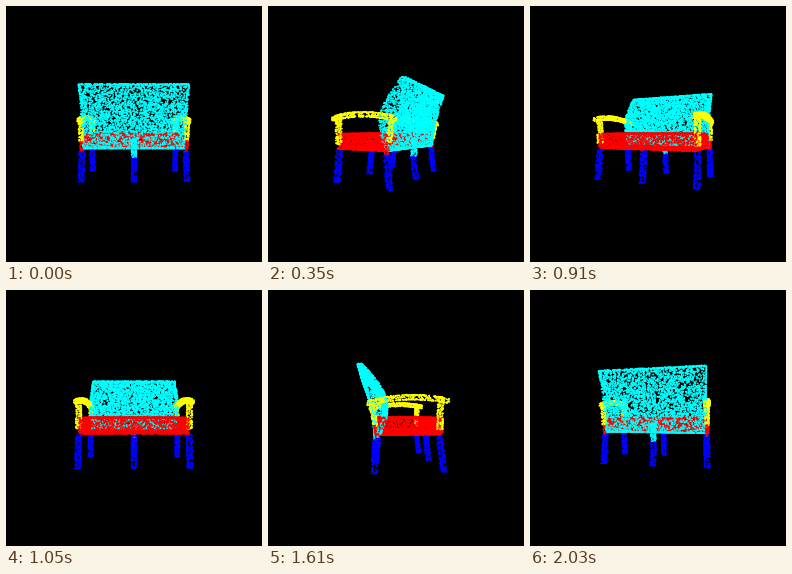
Animation, 256 px wide and 256 px high, one loop 2.1 s. Source, as a matplotlib script:

```python
import numpy as np
import matplotlib.pyplot as plt
from matplotlib.animation import FuncAnimation

SIZE, FRAMES, INTERVAL = 256, 30, 70
CAMERA = 215      # distance from the eye to the turning axis
DENSITY = 0.32    # points per unit of surface
DOT = 1.85        # dot diameter in pixels
CYAN, RED, YELLOW, BLUE = (0, 1, 1), (1, 0, 0), (1, 1, 0), (0, 0, 1)

SIDE = 47.5                    # legs and arms stand at -SIDE and SIDE
FRONT, REAR = 30, -19          # depth of the leg tops
TOP, BASE, FLOOR = -42, 13, 42.5

rng = np.random.default_rng(7)
points, colors = [], []


def shell(hx, hy, hz, density=DENSITY):
    """Random points on a box surface, in unit coordinates."""
    areas = np.array([hy * hz, hx * hz, hx * hy])
    n = int(8 * areas.sum() * density)
    p = rng.uniform(-1, 1, (n, 3))
    axis = rng.choice(3, n, p=areas / areas.sum())
    p[np.arange(n), axis] = rng.choice([-1, 1], n)
    return p.T


def add(x, y, z, color):
    points.append(np.column_stack([x, y, z]))
    colors.append(np.tile(color, (len(x), 1)))


def post(x, y0, y1, z, lean, half, color):
    """Upright bar whose depth starts at z and shifts by lean on its way down."""
    u, v, w = shell(half, (y1 - y0) / 2, half)
    t = (v + 1) / 2
    add(x + half * u, y0 + (y1 - y0) * t, z + lean * t + half * w, color)


def seat():
    u, v, w = shell(46.5, 6.8, 25.5, 1.4 * DENSITY)
    add(46.5 * u, 6.6 + 6.8 * v, 7.5 + 25.5 * w, RED)


def backrest():
    """Curved, tilted cushion, thickest in the middle."""
    half = (BASE - TOP) / 2
    u, v, w = shell(46.5, half, 4)
    t = (v + 1) / 2
    rear = -35 + 23 * t - 9 * t ** 2
    thick = 4 + 9.5 * np.sin(np.pi * t)
    add(u * (46.8 - 0.6 * t), TOP + 2 * half * t, rear + thick * (w + 1) / 2, CYAN)


def arm(x):
    u, v, w = shell(2.3, 1.8, 32)
    z = 5 + 32 * w
    add(x + 2.3 * u, -16.3 + 0.0036 * (z - 10) ** 2 + 1.8 * v, z, YELLOW)


seat()
backrest()
for x in (-SIDE, SIDE):
    arm(x)
    post(x, -14, 9, FRONT + 1, -1, 2, YELLOW)
    post(x, -11, 6, REAR - 5, 3, 1.6, YELLOW)
    post(x, 6, 16, REAR - 2, 2, 1.2, RED)
for x in (-SIDE, 0, SIDE):
    post(x, 15, FLOOR, FRONT, 3, 2, BLUE)
    post(x, 16 if x else 21, FLOOR, REAR, -3, 2, BLUE)
post(0, 5, 21, REAR - 1.5, 1, 2, CYAN)

X, Y, Z = np.concatenate(points).T
RGB = np.concatenate(colors)

fig = plt.figure(figsize=(SIZE / 100, SIZE / 100), dpi=100, facecolor="black")
ax = fig.add_axes([0, 0, 1, 1])
ax.set(xlim=(0, SIZE), ylim=(SIZE, 0))
ax.axis("off")
dots = ax.scatter(X, Y, s=(DOT * 72 / fig.dpi) ** 2, c=RGB, linewidths=0)


def draw(i):
    a = 2 * np.pi * i / FRAMES
    across = X * np.cos(a) - Z * np.sin(a)
    depth = X * np.sin(a) + Z * np.cos(a)
    zoom = CAMERA / (CAMERA + depth)
    order = np.argsort(-depth)
    screen = np.column_stack([across * zoom, Y * zoom]) + SIZE / 2
    dots.set_offsets(screen[order])
    dots.set_facecolors(RGB[order])
    return dots,


anim = FuncAnimation(fig, draw, frames=FRAMES, interval=INTERVAL,
                     repeat=True, repeat_delay=0)
plt.show()
```
